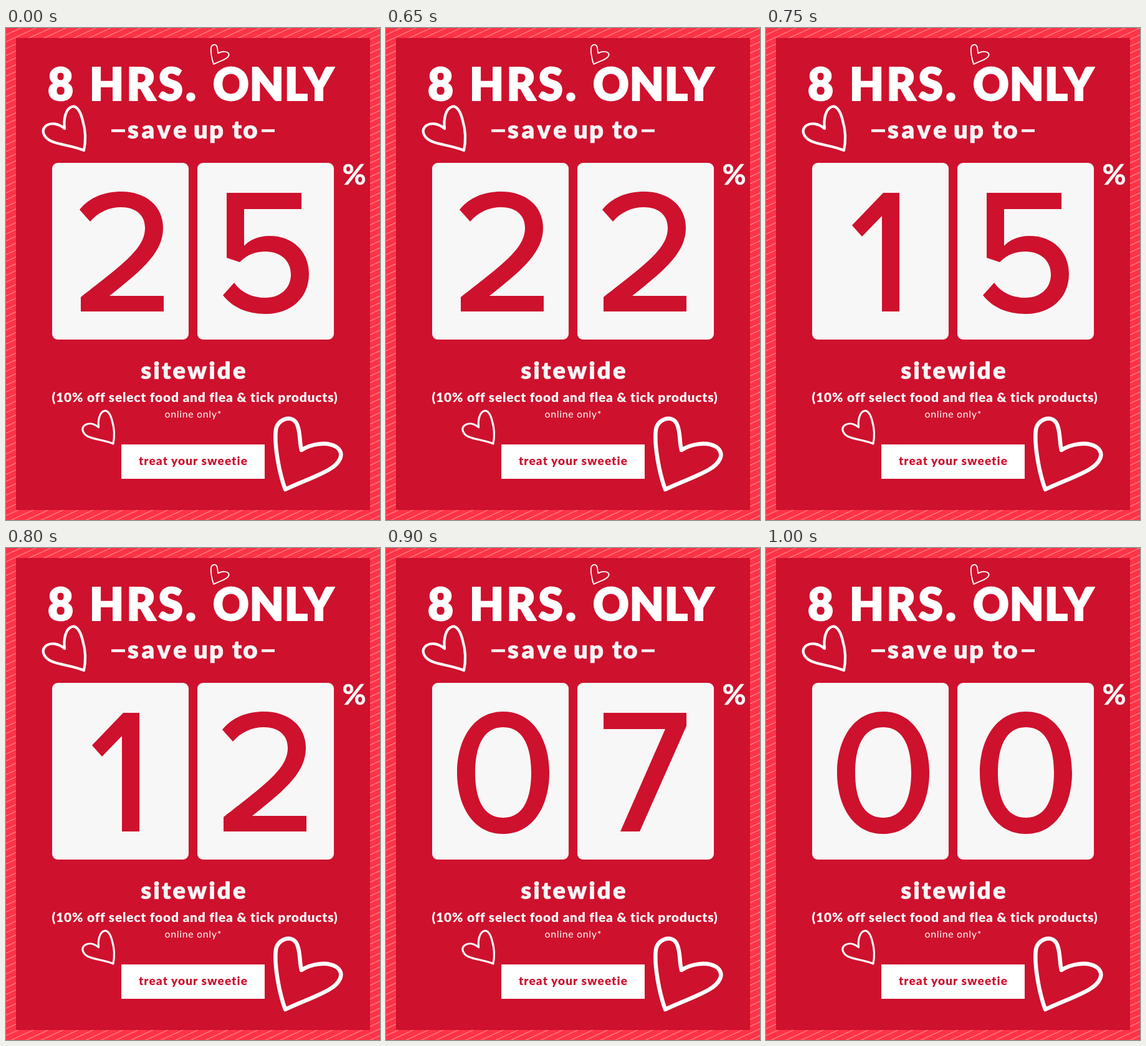
Write an HTML page that moves like this. It is 600x788 px and loops after 1.05 s.

```html
<!DOCTYPE html>
<html lang="en">
<head>
<meta charset="utf-8">
<title>8 hrs. only</title>
<style>
  html, body { margin: 0; width: 100%; height: 100%; overflow: hidden; background: #ff3347; }
  svg { display: block; }
  text { font-family: Lato, "Open Sans", sans-serif; font-weight: 900; fill: #fff; }
  .mid { text-anchor: middle; }
  .soft { fill: #f7f7f7; }
  .heavy { stroke: #fff; stroke-width: 2; }
  .firm { stroke: #f7f7f7; stroke-width: .7; }
  .hearts { fill: none; stroke: #fff; stroke-linejoin: round; }
  .digit { fill: #ce112d; fill-rule: evenodd; }
</style>
</head>
<body>
<svg width="600" height="788" viewBox="0 0 600 788">
  <defs>
    <pattern id="stripes" width="24" height="11" patternUnits="userSpaceOnUse">
      <path d="M-24 22L48 -11M-24 11L24 -11M0 22L48 0" stroke="#ff8088" stroke-width="1.3"/>
    </pattern>

    <!-- Numerals are centred on x = 0 -->
    <path id="d0" d="M-74 360C-74 310 -50 262 0 262S74 310 74 360S50 458 0 458S-74 410 -74 360Z
      M-45 360C-45 322 -34 287 0 287S45 322 45 360S34 432 0 432S-45 398 -45 360Z"/>
    <path id="d1" d="M0 264H26V454H-2V301L-34 334L-50 316Z"/>
    <path id="d2" d="M-70 291C-54 271 -30 262 -3 262C36 262 64 285 64 320C64 358 34 385 -22 429H65V454H-68V431
      C4 375 35 352 35 320C35 298 18 287 -3 287C-23 287 -40 295 -53 310Z"/>
    <path id="d3" d="M-69 291C-55 272 -30 262 -3 262C35 262 63 281 63 312C63 336 43 353 19 356C43 358 67 374 67 404
      C67 436 41 458 -3 458C-34 458 -58 446 -71 427L-56 409C-44 423 -26 432 -5 432C21 432 38 420 38 401
      C38 380 20 370 -7 370H-27V345H-7C17 345 35 335 35 315C35 298 17 287 -5 287C-25 287 -41 295 -55 309Z"/>
    <path id="d5" d="M-63 264H57V290H-35V349C-27 340 -13 333 6 333C42 333 69 357 69 394C69 432 40 458 0 458
      C-31 458 -54 447 -69 428L-51 408C-39 424 -22 432 -1 432C24 432 40 416 40 395C40 373 24 358 -1 358
      C-17 358 -30 363 -42 375L-63 368Z"/>
    <path id="d7" d="M-68 264H65V285L-10 454H-41L31 290H-68Z"/>

    <path id="heartLeft" stroke-width="4.2" d="M125 196C128 182 128 165 123 148C119 131 112 124 106 126
      C96 129 92 145 94 161C84 153 73 151 65 156C55 163 60 175 72 181C88 188 106 188 125 196Z"/>
    <path id="heartRight" stroke-width="6.5" d="M448 739C438 712 430 668 433 643C436 626 458 619 466 633
      C473 646 470 660 474 676C488 667 514 661 530 671C545 682 535 698 517 708C497 719 474 727 448 739Z"/>
  </defs>

  <rect width="600" height="788" fill="#ff3347"/>
  <rect width="600" height="788" fill="url(#stripes)"/>
  <rect x="16" y="16" width="568" height="756" fill="#ce112d"/>

  <g class="hearts">
    <use href="#heartLeft"/>
    <use href="#heartLeft" transform="translate(78.2 518.8) scale(.75)"/>
    <use href="#heartRight"/>
    <use href="#heartRight" transform="translate(209.9 -145.3) scale(.275)"/>
  </g>

  <text class="heavy" y="115.500" font-size="71"><tspan x="67">8</tspan> <tspan x="134" letter-spacing="4.3">HRS.</tspan> <tspan x="332" letter-spacing=".9">ONLY</tspan></text>
  <path d="M169 164.500h22M410 164.500h21" stroke="#f7f7f7" stroke-width="4.500"/>
  <text class="soft firm" y="177" font-size="40" letter-spacing="2.2"><tspan x="195" letter-spacing="4.8">save</tspan> <tspan x="301">up</tspan> <tspan x="363">to</tspan></text>

  <g class="soft">
    <rect x="74" y="216" width="219" height="283" rx="9"/>
    <rect x="307" y="216" width="219" height="283" rx="9"/>
  </g>
  <use id="tens" class="digit" x="188" href="#d2"/>
  <use id="ones" class="digit" x="417" href="#d5"/>
  <text class="mid soft firm" x="558.5" y="251" font-size="46.5" style="font-weight:700">%</text>

  <text class="mid soft firm" x="302" y="562" font-size="38" letter-spacing="3.3">sitewide</text>
  <text class="mid" x="303" y="599" font-size="21" letter-spacing=".77">(10% off select food and flea &amp; tick products)</text>
  <text class="mid" x="300.3" y="624" font-size="16" letter-spacing=".65" style="font-weight:400">online only*</text>

  <rect x="185" y="667" width="230" height="55" fill="#fff"/>
  <text class="mid" x="300.5" y="700" font-size="19" letter-spacing="1.1" style="fill:#ce112d">treat your sweetie</text>
</svg>
<script>
  const LOOP = 1050, HOLD = 600, STEP = 50;
  const countdown = ["23", "22", "20", "15", "12", "10", "07", "05", "00"];
  const tens = document.getElementById("tens");
  const ones = document.getElementById("ones");
  const start = performance.now();

  function draw(now) {
    const t = Math.max(0, now - start) % LOOP;
    const value = t < HOLD ? "25" : countdown[Math.floor((t - HOLD) / STEP)];
    tens.setAttribute("href", "#d" + value[0]);
    ones.setAttribute("href", "#d" + value[1]);
    requestAnimationFrame(draw);
  }
  draw(start);
</script>
</body>
</html>
```
